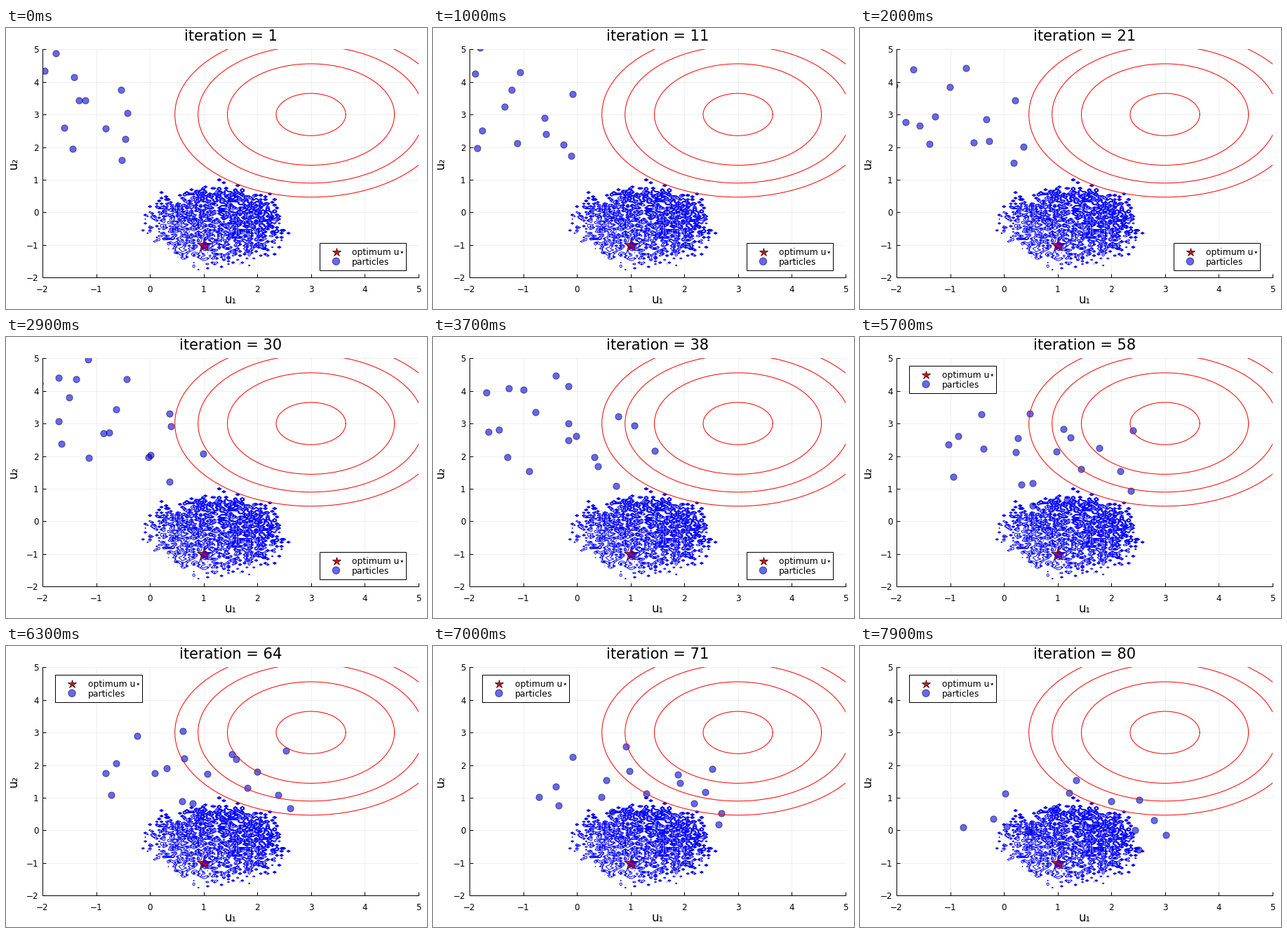
Animation of 600x400 px, one loop 8 s. Source, as a matplotlib script:

```python
import numpy as np
import matplotlib.pyplot as plt
from matplotlib.animation import FuncAnimation
from matplotlib.patches import Circle, Rectangle

PX = 0.72  # points per pixel at 100 dpi
FRAMES = 80
LEGEND_JUMP = 56
COUNT = 20

plt.rcParams["font.family"] = "DejaVu Sans"
rng = np.random.default_rng(7)
fig = plt.figure(figsize=(6, 4), dpi=100, facecolor="white")

# Plot area
ax = fig.add_axes([52 / 600, 1 - 355.3 / 400, 535.6 / 600, 325 / 400])
ax.set(xlim=(-2, 5), ylim=(-2, 5), xticks=range(-2, 6), yticks=range(-2, 6))
ax.spines[["top", "right"]].set_visible(False)
ax.spines[["left", "bottom"]].set_linewidth(PX)
ax.tick_params(direction="in", length=5 * PX, width=PX, labelsize=12 * PX)
ax.tick_params(axis="x", pad=11 * PX)
ax.tick_params(axis="y", pad=5.5 * PX)
ax.grid(color="black", alpha=0.1, linewidth=0.6 * PX)
ax.set_axisbelow(True)

# Pixel layer for text and legend
page = fig.add_axes([0, 0, 1, 1], xlim=(0, 600), ylim=(400, 0))
page.axis("off")


def label(x, y, text, size, ha="center", **kw):
    return page.text(x, y, text, fontsize=size * PX, ha=ha, va="baseline", **kw)


title = label(320.2, 18.4, "", 21)
label(320, 391.5, "u₁", 16.5)
label(16, 192, "u₂", 16.5, rotation=90, rotation_mode="anchor")

# Prior: rings at equal steps of squared radius
angle = np.linspace(0, 2 * np.pi, 200)
for k in range(4):
    r = np.sqrt(0.42 + 2 * k)
    ax.plot(3 + r * np.cos(angle), 3 + r * np.sin(angle), color="red",
            lw=PX, zorder=2.3)

# Posterior: noisy histogram on a fine grid, stronger to the upper right
X, Y = np.meshgrid(np.arange(-0.6, 3.2, 0.043), np.arange(-2.1, 1.6, 0.043))
rad = np.hypot((X - 1.23) / 1.32, (Y + 0.41) / 1.27)
hits = rng.random(X.shape) < 0.52 * np.exp(-(rad / 0.92) ** 7)
height = 2.4 * np.exp(0.35 * (X - 1.2) + 0.45 * (Y + 0.4))
Z = hits * height * rng.uniform(0.35, 1.65, X.shape)
ax.contour(X, Y, Z, levels=[0.7, 1.6, 2.5, 3.4], colors="blue",
           linewidths=0.95 * PX, zorder=2.2)

STAR = dict(marker="*", color="red", mec="black", mew=0.7 * PX, ls="none")
BALL = dict(fc=(0, 0, 1, 0.6), ec=(0, 0, 0, 0.6), lw=0.9 * PX)
ax.plot(1, -1, ms=20 * PX, zorder=2.1, **STAR)


def legend(x, y):
    return [
        page.add_patch(Rectangle((x, y), 123.5, 39, fc="white", ec="black",
                                 lw=PX)),
        page.plot(x + 24, y + 12.9, ms=12 * PX, **STAR)[0],
        page.add_patch(Circle((x + 24, y + 26.2), 5.2, **BALL)),
        label(x + 46.6, y + 17.2, "optimum u⋆", 12.4, ha="left"),
        label(x + 46.6, y + 30.8, "particles", 12.4, ha="left"),
    ]


low_legend = legend(446.5, 306)
high_legend = legend(70, 41)

# Particles: an even golden-angle cloud, each with its own slow wander
n = np.arange(COUNT)
reach = 2 * np.sqrt((n + 0.5) / COUNT)
turn = n * np.pi * (3 - np.sqrt(5))
cloud_x, cloud_y = reach * np.cos(turn), reach * np.sin(turn)
phase = rng.uniform(0, 2 * np.pi, (2, COUNT))
rate = rng.uniform(5, 12, (2, COUNT))


def particles_at(s):
    """Drift from the upper left into the posterior, s from 0 to 1."""
    wander = 0.25 * np.sin(rate * s + phase)
    x = -1.9 + 3.2 * s * s * (3 - 2 * s) + 1.05 * cloud_x
    y = 3.4 - 3.1 * s ** 2.3 + (0.85 - 0.3 * s ** 3) * cloud_y
    y -= 0.6 * (1 - s) * cloud_x
    return x + wander[0], y + wander[1]


swarm = ax.plot([], [], "o", ms=9.2 * PX, mfc=BALL["fc"], mec=BALL["ec"],
                mew=BALL["lw"], zorder=2.15)[0]


def draw(i):
    title.set_text(f"iteration = {i + 1}")
    swarm.set_data(*particles_at(i / (FRAMES - 1)))
    for part in low_legend:
        part.set_visible(i < LEGEND_JUMP)
    for part in high_legend:
        part.set_visible(i >= LEGEND_JUMP)
    return [title, swarm, *low_legend, *high_legend]


anim = FuncAnimation(fig, draw, frames=FRAMES, interval=100, repeat=True,
                     repeat_delay=0, blit=False)
plt.show()
```
